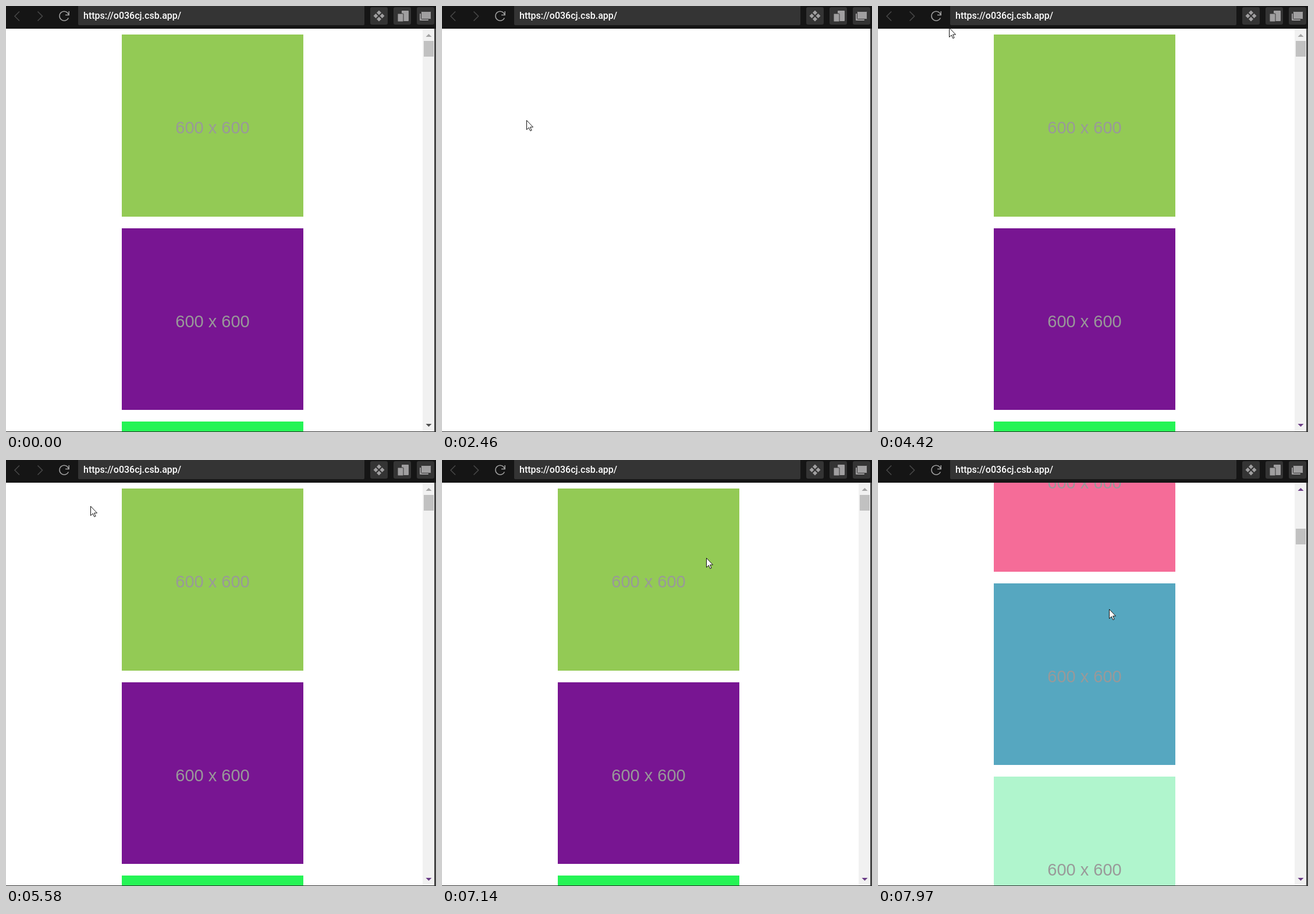
Recreate the animation shown at these times as an HTML page. Size 739 by 732 pixels, loop 8000 ms.

```html
<!DOCTYPE html>
<html lang="en">
<head>
<meta charset="utf-8">
<title>Scrolling image list</title>
<style>
  html, body { margin: 0; width: 100%; height: 100%; overflow: hidden; background: #fff; }
  svg { display: block; width: 739px; height: 732px; }
  .url { font: 500 16px Roboto, sans-serif; fill: #fff; }
  .size { font: 29px "Liberation Sans", Arial, sans-serif; fill: #999; text-anchor: middle; }
  .loading { font: 20px "Liberation Serif", "Times New Roman", serif; fill: #222; }
  .line { fill: none; stroke-width: 1.5; }
</style>
</head>
<body>
<svg viewBox="0 0 739 732">
  <rect width="739" height="732" fill="#fff"/>
  <text id="loading" class="loading" x="4" y="77">Loading...</text>

  <g id="page">
    <g id="tiles"></g>
    <rect x="716" y="39" width="20" height="692" fill="#f1f1f1"/>
    <rect id="thumb" x="718" width="17" height="27" fill="#c1c1c1"/>
    <path id="up" d="M721.5 53h10l-5-5z"/>
    <path id="down" d="M721.5 718h10l-5 5z"/>
  </g>

  <rect width="739" height="39" fill="#151515"/>
  <path d="M124 0h492v31a2 2 0 0 1-2 2H126a2 2 0 0 1-2-2z" fill="#343434"/>
  <text class="url" x="133" y="22">https://o036cj.csb.app/</text>
  <path class="line" stroke="#484848" d="M23 9.5l-8 8 8 8M54.5 9.5l8 8-8 8"/>
  <path id="reload" class="line" d="M107.5 14.5A8 8 0 1 0 107.3 20.5M108.2 9v6.500H102"/>

  <g id="buttons" fill="#343434"></g>
  <g fill="#a09fa0">
    <g id="diamonds"></g>
    <rect x="680" y="8" width="12" height="18" rx="1"/>
    <rect x="673" y="13" width="10" height="14" rx="1" stroke="#343434"/>
    <rect x="711" y="13" width="15" height="12" rx="1"/>
    <rect x="713.5" y="9.500" width="17" height="13" rx="1" stroke="#343434"/>
  </g>

  <rect x="736" y="39" width="3" height="693" fill="#454545"/>
  <rect y="731" width="739" height="1" fill="#2c2c2c"/>
  <path id="cursor" d="M.5.5v16l3.700-3.500 2.600 5.600 2.300-1-2.500-5.500h4.900z" fill="#fff" stroke="#111"/>
</svg>

<script>
const LOOP = 8000;
const TOP = 49, SIZE = 312.5, PITCH = SIZE + 20;
const COLORS = ['#93ca55', '#781592', '#25f455', '#d12875', '#f56c98', '#56a7c0', '#b0f5cd'];

// Pointer: where it enters, then each move as start, end, x, y
const ENTER = { time: 130, x: 632, y: 643 };
const MOVES = [
  [130, 900, 101, 22], [1390, 1860, 145, 196], [3860, 4630, 101, 24],
  [5300, 5860, 159, 242], [6660, 6870, 475, 166], [7000, 7970, 397, 256]
];
// Reloads: page goes blank, "Loading..." appears, images return
const LOADS = [[2460, 3010, 3140], [5790, 6260, 6330]];
const SCROLL = { start: 7280, end: 7970, distance: 1499.8, power: 1.405 };

const $ = id => document.getElementById(id);
const set = (el, name, value) => el.setAttribute(name, value);
const show = (el, on) => { el.style.visibility = on ? 'visible' : 'hidden'; };
const within = (v, from, to) => v >= from && v < to;
const progress = (t, from, to) => Math.min(1, Math.max(0, (t - from) / (to - from)));

$('buttons').innerHTML = [626, 666, 706].map(x =>
  `<rect x="${x}" y="2" width="30" height="30" rx="3"/>`).join('');
$('diamonds').innerHTML = [[0, -1], [1, 0], [0, 1], [-1, 0]].map(([x, y]) =>
  `<path d="M${641 + 5.5 * x} ${13 + 5.5 * y}l4 4-4 4-4-4z"/>`).join('');
$('tiles').innerHTML = COLORS.map(c =>
  `<g><rect x="199" width="312" fill="${c}"/>` +
  '<text class="size" x="355" y="170">600 x 600</text></g>').join('');
const tiles = [...$('tiles').children];

// Curved moves: going up, the vertical part leads; going down, the horizontal.
function pointerAt(t) {
  let { x, y } = ENTER;
  for (const [from, to, x1, y1] of MOVES) {
    const p = progress(t, from, to);
    const early = p * (2 - p), late = p * p, up = y1 < y;
    x += (x1 - x) * (up ? late : early);
    y += (y1 - y) * (up ? early : late);
    if (p < 1) break;
  }
  return [Math.round(x), Math.round(y)];
}

function scrollAt(t) {
  return SCROLL.distance * progress(t, SCROLL.start, SCROLL.end) ** SCROLL.power;
}

function draw(t) {
  const [x, y] = pointerAt(t), scroll = scrollAt(t);

  show($('cursor'), t >= ENTER.time);
  set($('cursor'), 'transform', `translate(${x} ${y})`);
  const hover = within(x, 88, 112) && within(y, 5, 30);
  set($('reload'), 'stroke', hover ? '#fff' : '#a0a0a0');

  show($('page'), !LOADS.some(([blank, , done]) => within(t, blank, done)));
  show($('loading'), LOADS.some(([, text, done]) => within(t, text, done)));

  tiles.forEach((tile, i) => {
    const top = TOP + i * PITCH - scroll, snapped = Math.round(top);
    set(tile, 'transform', `translate(0 ${snapped})`);
    set(tile.firstChild, 'height', Math.round(top + SIZE) - snapped);
  });

  const arrow = t < LOADS[0][2] ? '#505050' : '#6a3d86';
  set($('thumb'), 'y', Math.round(60 + scroll * 0.0385));
  set($('up'), 'fill', scroll > 0 ? arrow : '#a3a3a3');
  set($('down'), 'fill', arrow);
}

const start = performance.now();
function frame() {
  draw((performance.now() - start) % LOOP);
  requestAnimationFrame(frame);
}
frame();
</script>
</body>
</html>
```
